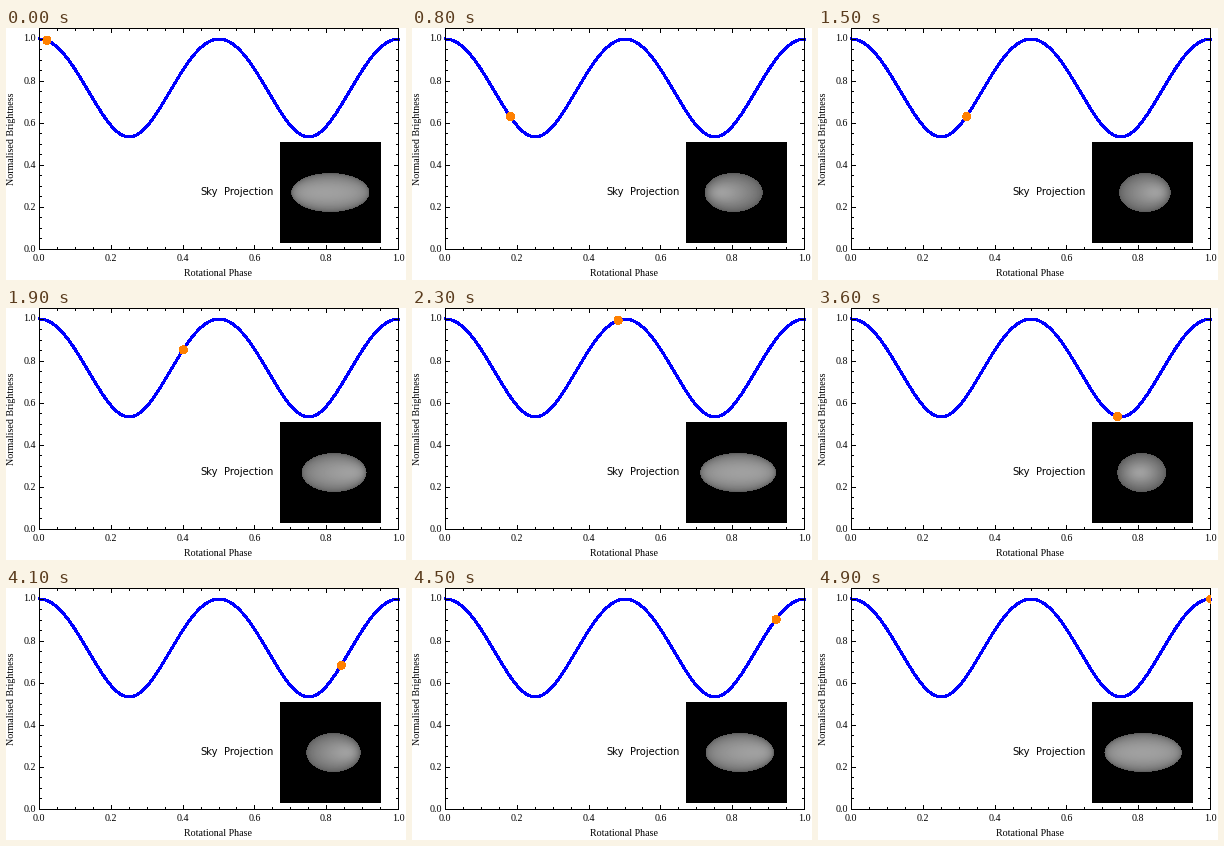
Write a matplotlib script that moves like this. It is 400x252 px and loops after 5 s.

```python
import numpy as np
import matplotlib.pyplot as plt
from matplotlib.animation import FuncAnimation
from matplotlib.patches import Circle, Rectangle

W, H, DPI = 400, 252, 72
FRAMES, INTERVAL = 50, 100
LEFT, RIGHT, TOP, BOTTOM = 33.5, 392.5, 0.5, 221.5
BOX_X, BOX_Y, BOX = 274, 114, 101
LONG, DEEP, TALL = 38.7, 23.0, 19.5  # ellipsoid semi-axes in pixels
MIN_BRIGHTNESS = 0.535


def to_x(phase):
    return LEFT + (RIGHT - LEFT) * phase


def to_y(value):
    return BOTTOM - (BOTTOM - TOP) * value / 1.05


def brightness(phase):
    """Blend of projected area and a plain cosine variation."""
    cos2 = np.cos(2 * np.pi * phase) ** 2
    area = np.sqrt(cos2 + MIN_BRIGHTNESS**2 * (1 - cos2))
    cosine = MIN_BRIGHTNESS + (1 - MIN_BRIGHTNESS) * cos2
    return (area + cosine) / 2


def sky_view(phase):
    """Grey image of the rotating ellipsoid, shaded by its surface normals."""
    angle = 2 * np.pi * phase
    c, s = np.cos(angle), np.sin(angle)
    half = np.hypot(LONG * c, DEEP * s)

    # The near end looks larger, so the outline leans towards it.
    lean = np.sin(2 * angle)
    left = half + 5.6 * lean + 2.2 * s * s
    right = half - 1.3 * lean
    center = 325.2 - BOX_X + (right - left) / 2
    width = (left + right) / 2

    py, px = np.mgrid[0:BOX, 0:BOX] + 0.5
    u, v = (px - center) / width, (py - BOX / 2) / TALL
    x, y = u * half, v * TALL

    qa = (c / LONG) ** 2 + (s / DEEP) ** 2
    qb = s * c * (1 / DEEP**2 - 1 / LONG**2)
    qc = (s / LONG) ** 2 + (c / DEEP) ** 2
    root = (qb * x) ** 2 - qc * (qa * x**2 + (y / TALL) ** 2 - 1)
    z = (-qb * x + np.sqrt(np.maximum(root, 0))) / qc
    nx, ny, nz = qa * x + qb * z, y / TALL**2, qb * x + qc * z
    facing = nz / np.sqrt(nx**2 + ny**2 + nz**2)
    return np.where(np.hypot(u, v) <= 1, 85 + 75 * facing, 0)


fig = plt.figure(figsize=(W / DPI, H / DPI), dpi=DPI, facecolor="white")
ax = fig.add_axes([0, 0, 1, 1])


def line(x0, y0, x1, y1):
    # Half a pixel back, so that snapping lands on the pixel holding the point.
    ax.plot([x0 - 0.5, x1 - 0.5], [y0 - 0.5, y1 - 0.5], color="black", lw=1,
            solid_capstyle="projecting", snap=True, zorder=3)


def label(x, y, text, family="Liberation Serif", **kw):
    style = dict(ha="center", va="baseline", fontsize=10, color="black")
    ax.text(x, y, text, family=family, **{**style, **kw})


view = ax.imshow(sky_view(0), cmap="gray", vmin=0, vmax=255,
                 interpolation="nearest", zorder=4,
                 extent=(BOX_X, BOX_X + BOX, BOX_Y + BOX, BOX_Y))
ax.set(xlim=(0, W), ylim=(H, 0), aspect="auto")
ax.axis("off")

phases = np.linspace(0, 1, 400)
ax.plot(to_x(phases), to_y(brightness(phases)), color="#0000ff", lw=2,
        antialiased=False, zorder=2)

for x in (LEFT, RIGHT):
    line(x, TOP, x, BOTTOM)
for y in (TOP, BOTTOM):
    line(LEFT, y, RIGHT, y)

for i in range(21):
    value, major = i / 20, i % 4 == 0
    size = 4 if major else 2
    x, y = to_x(value), to_y(value)
    line(x, BOTTOM, x, BOTTOM - size)
    line(x, TOP, x, TOP + size)
    line(LEFT, y, LEFT + size, y)
    line(RIGHT, y, RIGHT - size, y)
    if major:
        label(x - 0.4, 233, f"{value:.1f}")
        label(30, y + 2.4, f"{value:.1f}", ha="right")

label(212.5, 248, "Rotational Phase")
label(5.5, 110.5, "Normalised Brightness", rotation=90, va="center")
label(194.5, 167.3, "Sky", family="DejaVu Sans", ha="left")
label(267.5, 167.3, "Projection", family="DejaVu Sans", ha="right")

marker = ax.add_patch(Circle((0, 0), 4, fc="#ff8000", ec="none",
                             antialiased=False, zorder=5))
plot_area = Rectangle((LEFT - 0.5, 0), RIGHT - LEFT + 1, BOTTOM + 0.5,
                      transform=ax.transData)
marker.set_clip_path(plot_area)


def update(frame):
    phase = (frame + 1) / FRAMES
    marker.center = to_x(phase) + 0.3, to_y(brightness(phase))
    view.set_data(sky_view(phase))
    return marker, view


animation = FuncAnimation(fig, update, frames=FRAMES, interval=INTERVAL,
                          repeat=True, repeat_delay=0)
plt.show()
```
